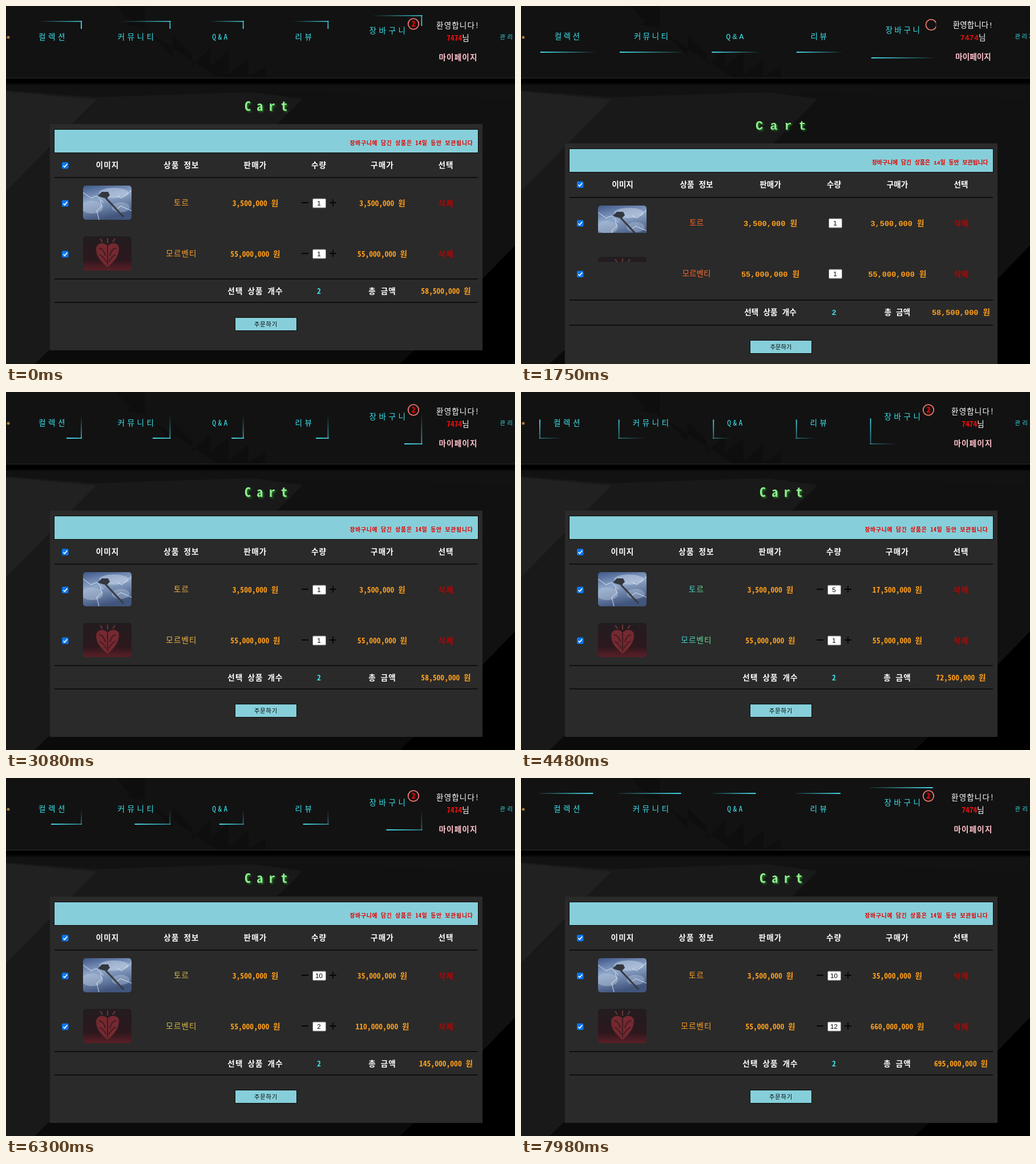
An HTML page for the animation above (8 s loop, 892x628 px).

```html
<!DOCTYPE html>
<html lang="ko">
<head>
<meta charset="utf-8">
<title>Cart</title>
<style>
html, body { margin: 0; width: 100%; height: 100%; overflow: hidden; background: #111; }
svg { display: block; }
text { white-space: pre; }
.web .hangul:not([letter-spacing]) { letter-spacing: .08em; }
</style>
</head>
<body>
<svg id="stage" width="892" height="628" viewBox="0 0 892 628">
  <defs>
    <linearGradient id="run0"><stop stop-color="#45d8e8" stop-opacity="0"/><stop offset="1" stop-color="#45d8e8"/></linearGradient>
    <linearGradient id="run1" href="#run0" x2="0" y2="1"/>
    <linearGradient id="run2" href="#run0" x1="1" x2="0"/>
    <linearGradient id="run3" href="#run0" x2="0" y1="1" y2="0"/>
    <linearGradient id="name"><stop id="nameL"/><stop id="nameR" offset="1"/></linearGradient>
    <linearGradient id="sky" x2=".3" y2="1"><stop stop-color="#3d5688"/><stop offset=".45" stop-color="#8ea6c8"/><stop offset="1" stop-color="#41557d"/></linearGradient>
    <linearGradient id="dusk" x2="0" y2="1"><stop stop-color="#221c20"/><stop offset=".7" stop-color="#2c181d"/><stop offset="1" stop-color="#5c1f27"/></linearGradient>
    <linearGradient id="shade" x2="0" y2="1"><stop stop-color="#000"/><stop offset=".5" stop-color="#000"/><stop offset="1" stop-color="#000" stop-opacity="0"/></linearGradient>
    <clipPath id="round"><rect width="85" height="60" rx="5"/></clipPath>
    <g id="storm" clip-path="url(#round)">
      <rect width="85" height="60" fill="url(#sky)"/>
      <ellipse cx="54" cy="13" rx="26" ry="9" fill="#c3d2e6" opacity=".55"/>
      <ellipse cx="16" cy="38" rx="19" ry="11" fill="#b4c6de" opacity=".5"/>
      <ellipse cx="66" cy="38" rx="16" ry="9" fill="#b4c6de" opacity=".4"/>
      <path d="M0 12L14 22 24 18 36 30M28 60L24 44 33 36 30 26M85 8L68 22 60 18M85 44L66 36 58 42" fill="none" stroke="#e4edf8" stroke-width=".9"/>
      <path d="M40 22L71 55" stroke="#3a3b42" stroke-width="3.2"/>
      <path d="M26 18L33 11 44 11 47 17 41 23 31 20Z" fill="#33373f"/>
    </g>
    <g id="heart" clip-path="url(#round)">
      <rect width="85" height="60" fill="url(#dusk)"/>
      <path d="M34 10L30 4M43 12V3M52 10L56 4" stroke="#6b3835" stroke-width="2"/>
      <path d="M43 54C33 46 23 36 23 23C23 11 37 9 43 17C50 9 64 11 63 23C62 36 53 46 43 54Z" fill="#752930"/>
      <path d="M43 17V50M28 21Q36 21 39 34M58 21Q50 21 47 34M29 32Q36 36 41 45M57 32Q50 36 45 45" fill="none" stroke="#421a20" stroke-width="2"/>
    </g>
  </defs>
  <g id="backdrop">
    <rect width="892" height="628" fill="#111"/>
    <path d="M0 137L330 137 520 163 55 628H0Z" fill="#191919"/>
    <path d="M0 150L158 164 0 325Z" fill="#212121"/>
    <path d="M0 137H892V165L520 150 400 152 158 160 0 148Z" fill="#121212"/>
    <path d="M892 420L690 628H892Z" fill="#000"/>
    <path d="M75 604L50 628H690L720 600Z" fill="#0b0b0b"/>
    <rect width="892" height="126" fill="#121212"/>
    <path d="M193 0H243V38L210 34 243 2V38L292 88V52L326 86V106L358 73V106L390 80V121L425 92V124L455 106V125H370L210 20Z" fill="#0e0e0e"/>
    <rect y="126" width="892" height="1" fill="#2b2b2b"/>
    <rect y="127" width="892" height="13" fill="url(#shade)"/>
    <circle cx="4" cy="55" r="2.5" fill="#a97c35"/>
  </g>
</svg>
<script>
const LOOP = 8000, STEP = 70, TURN = 1050, FADE = 5250;
const RELOAD = 1750, FONTS_READY = 1960, SETTLED = 2100;
const SIZE = 13.6, ORANGE = '#ff9f1a', AQUA = '#3ce0ea', BAR = '#86cfda';
const PRICES = [3500000, 55000000], NAMES = ['토르', '모르벤티'], ART = ['storm', 'heart'];
const COLUMNS = [178, 307.5, 437, 548.5, 659.5, 771];
const HANGUL = .92; // natural advance of a Hangul syllable, in em
const stage = document.getElementById('stage');

// Two typesettings of the page: before and after its web font arrives.
const LAYOUTS = {
  plain: {
    font: '"Liberation Mono", "Noto Sans CJK KR", "Noto Sans CJK", monospace',
    half: .6, full: HANGUL, navY: 53, titleX: 411, titleGap: 12, title: 209, panel: 241, bar: 250.5, head: 313,
    rows: [381, 470], pics: [350, 440], rules: [336, 516, 560], total: 537.5, button: 586.5,
    field: 539, badge: [718.8, 33]
  },
  web: {
    font: '"Noto Sans Mono CJK KR", "Noto Sans Mono CJK", "Noto Sans CJK KR", "Noto Sans CJK", monospace',
    half: .5, full: 1, navY: 54, titleX: 418, titleGap: 10.3, title: 176, panel: 208, bar: 217.5, head: 280.5,
    rows: [347, 436], pics: [316, 405], rules: [302, 480, 521], total: 501, button: 547.5,
    field: 537, badge: [714, 31.5]
  }
};

function add(parent, tag, attrs) {
  const node = document.createElementNS('http://www.w3.org/2000/svg', tag);
  for (const key in attrs) node.setAttribute(key, attrs[key]);
  parent.append(node);
  return node;
}

// y is the vertical middle of the line
function write(parent, x, y, string, fill, attrs = {}) {
  const size = attrs['font-size'] || SIZE;
  const node = add(parent, 'text', { x, y: y + size * .36, fill, 'font-size': size, ...attrs });
  if (/^[가-힣]/.test(string)) node.setAttribute('class', 'hangul');
  node.textContent = string;
  return node;
}
const centred = { 'text-anchor': 'middle' };
const bold = { 'font-weight': 700 };
const boldCentred = { ...centred, ...bold };
const glow = (color, x = 1, y = 1, blur = 1) => ({ style: `filter:drop-shadow(${x}px ${y}px ${blur}px ${color})` });
const hangulGap = (page, size, gap) => gap + (page.full - HANGUL) * size;

function checkbox(parent, y) {
  add(parent, 'rect', { x: 98, y: y - 5.5, width: 11.5, height: 11.5, rx: 2, fill: '#0b76ef' });
  add(parent, 'path', { d: `M100.5 ${y + .5}l2.3 2.5 4.5-5.5`, fill: 'none', stroke: '#fff', 'stroke-width': 1.7 });
}

function buildNav(root, page) {
  const gap = 3.4;
  return ['컬렉션', '커뮤니티', 'Q&A', '리뷰', '장바구니'].map((label, i, all) => {
    const last = i === all.length - 1, latin = label === 'Q&A';
    const advance = SIZE * (latin ? page.half : page.full) + gap;
    const width = label.length * advance + 50, height = last ? 76 : 56;
    const x = 82.5 + 147 * i - width / 2, y = last ? 16 : 26;
    write(root, x + 25, last ? page.navY - 10.5 : page.navY, label, AQUA,
      { 'letter-spacing': latin ? gap : hangulGap(page, SIZE, gap) });
    const box = add(root, 'svg', { x, y, width, height, overflow: 'hidden' });
    const runners = [0, 1, 2, 3].map(k => add(box, 'rect', {
      width: k % 2 ? 2 : width, height: k % 2 ? height : 2, fill: `url(#run${k})`
    }));
    if (last) {
      const [cx, cy] = page.badge;
      add(box, 'circle', { cx: cx - x, cy: cy - y, r: 9.3, fill: 'none', stroke: '#f0786e', 'stroke-width': 1.8 });
      if (page === LAYOUTS.web)
        write(box, cx - x, cy - y, '2', '#e00c0c', { ...boldCentred, ...glow('#900') });
    }
    return { runners, width, height };
  });
}

function buildPage(page) {
  const web = page === LAYOUTS.web;
  const root = add(stage, 'g', { 'font-family': page.font, class: web ? 'web' : 'plain' });
  const nav = buildNav(root, page);
  const shift = page.navY - 54;

  write(root, 792, 34 + shift, '환영합니다!', '#fff', centred);
  const user = write(root, 792, 56 + shift, '', '#fff', centred);
  const id = add(user, 'tspan', { fill: '#e90d0d', ...bold });
  id.textContent = '7474';
  user.append('님');
  write(root, 792.5, 90 + shift, '마이페이지', '#ffc0cb', boldCentred);
  write(root, 865.5, page.navY, '관리자', AQUA,
    { 'font-size': 10.2, 'letter-spacing': hangulGap(page, 10.2, 2.7) });

  const content = add(root, 'g');
  write(content, page.titleX, page.title, 'Cart', '#90ee90',
    { 'font-size': 22, 'letter-spacing': page.titleGap, ...bold, ...glow('#237a23', 2, 2, 1.5) });
  const panel = add(content, 'g');
  add(panel, 'rect', { x: 77, y: page.panel, width: 758, height: web ? 397 : 420, fill: '#2a2a2a' });
  add(panel, 'rect', { x: 84.5, y: page.bar, width: 743, height: 41, fill: BAR, stroke: '#0a0a0a' });
  write(panel, 818.5, page.bar + 23.5, '장바구니에 담긴 상품은 14일 동안 보관됩니다', '#d40808',
    { 'font-size': 9.8, 'text-anchor': 'end', ...bold, ...glow('#e8a0a0', .5, .5, .5) });

  checkbox(panel, page.head);
  ['이미지', '상품 정보', '판매가', '수량', '구매가', '선택'].forEach((label, i) =>
    write(panel, COLUMNS[i], page.head, label, '#fff', boldCentred));
  for (const y of page.rules) add(panel, 'rect', { x: 85, y: y - 1, width: 742, height: 1.6, fill: '#080808' });

  const rows = page.rows.map((y, i) => {
    checkbox(panel, y);
    const frame = add(panel, 'svg', { x: 135, y: page.pics[i], width: 85, height: 60 });
    add(frame, 'use', { href: '#' + ART[i] });
    write(panel, COLUMNS[1], y - .5, NAMES[i], 'url(#name)', centred);
    write(panel, COLUMNS[2], y, PRICES[i].toLocaleString('en-US') + ' 원', ORANGE, boldCentred);
    add(panel, 'rect', { x: page.field + .5, y: y - 8, width: 23, height: 16, rx: 1.5, fill: '#fff', stroke: '#777' });
    const count = write(panel, page.field + 11.5, y, '1', '#000',
      { ...centred, 'font-size': 11.5, 'font-family': '"Liberation Sans", sans-serif' });
    if (web) add(panel, 'path', { d: `M518 ${y - 1}h12M567 ${y - 1}h12M573 ${y - 7}v12`, stroke: '#050505', 'stroke-width': 1.8 });
    const sum = write(panel, COLUMNS[4], y, '', ORANGE, boldCentred);
    write(panel, COLUMNS[5], y, '삭제', '#c20808', { ...centred, ...glow('#900') });
    return { frame, count, sum };
  });

  write(panel, COLUMNS[2], page.total, '선택 상품 개수', '#fff', boldCentred);
  write(panel, COLUMNS[3], page.total, '2', AQUA, boldCentred);
  write(panel, COLUMNS[4], page.total, '총 금액', '#fff', boldCentred);
  const total = write(panel, COLUMNS[5], page.total, '', ORANGE, boldCentred);
  add(panel, 'rect', { x: 401.5, y: page.button, width: 108, height: 23, fill: BAR, stroke: '#0a0a0a' });
  write(panel, 455.5, page.button + 11.5, '주문하기', '#000', { ...centred, 'font-size': 10.2 });
  return { root, nav, content, panel, rows, total };
}

const plain = buildPage(LAYOUTS.plain), web = buildPage(LAYOUTS.web);
const nameL = document.getElementById('nameL'), nameR = document.getElementById('nameR');

// [phase, left colour, right colour]
const HUES = [
  [0, [255, 98, 40], [255, 104, 40]],
  [.187, [255, 160, 36], [255, 160, 40]],
  [.253, [246, 176, 60], [236, 180, 66]],
  [.38, [170, 205, 100], [200, 200, 80]],
  [.52, [62, 205, 220], [110, 220, 125]],
  [.72, [60, 200, 228], [85, 215, 150]],
  [.86, [200, 195, 80], [225, 185, 65]],
  [1, [255, 98, 40], [255, 104, 40]]
];
const mod1 = v => ((v % 1) + 1) % 1;

function tintNames(phase) {
  const k = HUES.findIndex(h => h[0] > phase);
  const a = HUES[k - 1], b = HUES[k], f = (phase - a[0]) / (b[0] - a[0]);
  [nameL, nameR].forEach((stop, side) => {
    const rgb = a[side + 1].map((v, i) => Math.round(v + (b[side + 1][i] - v) * f));
    stop.setAttribute('stop-color', `rgb(${rgb})`);
  });
}

// Each side's streak crosses its edge in half a turn, a quarter turn after the previous one.
function runBorders(nav, phase) {
  for (const { runners, width, height } of nav) {
    runners.forEach((streak, k) => {
      const offset = -1 + 2 * Math.min(1, 2 * mod1(phase - k / 4));
      const x = [offset * width, width - 2, -offset * width, 0][k];
      const y = [0, offset * height, height - 2, -offset * height][k];
      streak.setAttribute('x', x);
      streak.setAttribute('y', y);
    });
  }
}

function quantities(t) {
  const first = t < 3780 ? 1 : Math.min(10, 2 + Math.floor((t - 3780) / 180));
  const second = t < 6160 ? 1 : Math.max(2, 2 + Math.floor((t - 6380) / 160));
  return [first, second];
}

function borderPhase(t) {
  if (t < RELOAD) return .3125 + Math.min(t, 1400) / TURN;
  if (t < SETTLED) return .75 + Math.min(t - RELOAD, FONTS_READY - RELOAD) / TURN;
  return .3 + (t - 7000) / TURN;
}

function render(time) {
  const t = Math.floor(time % LOOP / STEP) * STEP;
  const early = t >= RELOAD && t < FONTS_READY;
  const page = early ? plain : web;
  plain.root.setAttribute('display', early ? 'inline' : 'none');
  web.root.setAttribute('display', early ? 'none' : 'inline');

  const drop = t >= FONTS_READY && t < SETTLED ? 33 : 0;
  web.content.setAttribute('transform', `translate(0 ${drop})`);
  web.panel.setAttribute('transform', `translate(0 ${t < RELOAD ? -1 : 0})`);
  runBorders(page.nav, borderPhase(t));
  tintNames(t < RELOAD ? .187 + Math.min(t, 1400) / FADE : mod1((t - RELOAD) / FADE));

  const counts = quantities(t);
  const won = n => n.toLocaleString('en-US') + ' 원';
  const sums = counts.map((n, i) => n * PRICES[i]);
  page.rows.forEach((row, i) => {
    row.count.textContent = counts[i];
    row.sum.textContent = won(sums[i]);
    const loaded = early ? Math.min(60, [48, 9][i] + (t - RELOAD) * .35) : 60;
    row.frame.setAttribute('height', loaded);
  });
  page.total.textContent = won(sums[0] + sums[1]);
}

const start = performance.now();
function tick() {
  render(performance.now() - start);
  requestAnimationFrame(tick);
}
tick();
</script>
</body>
</html>
```
